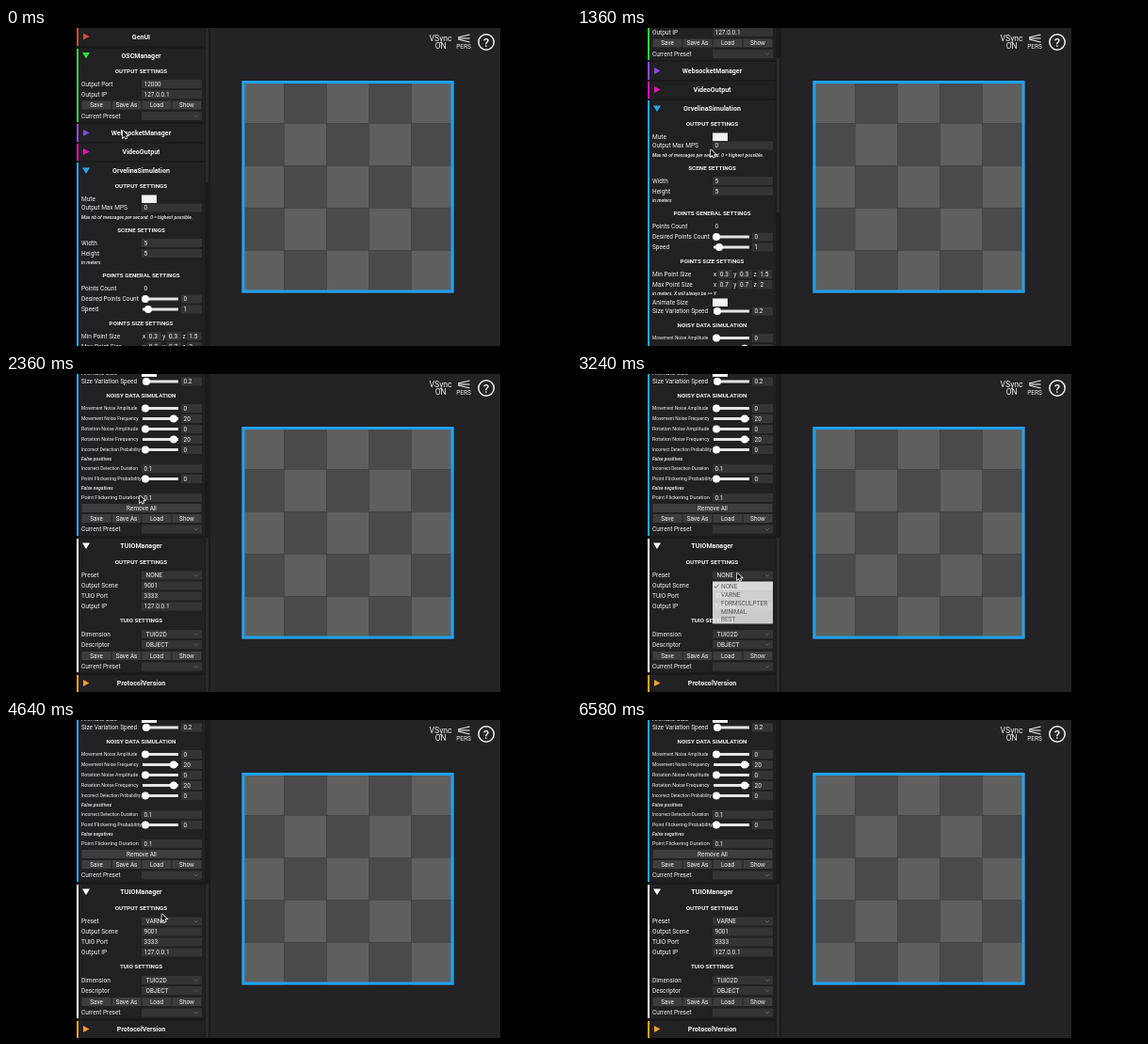
These frames come from a looping animation (600 by 338 pixels, 7300 ms). An HTML page with a canvas:

```html
<!DOCTYPE html>
<html lang="en">
<head>
<meta charset="utf-8">
<title>Settings panel</title>
<style>
html, body { margin: 0; width: 100%; height: 100%; overflow: hidden; background: #000; }
canvas { display: block; width: 600px; height: 338px; }
</style>
</head>
<body>
<canvas id="stage" width="600" height="338"></canvas>
<script>
const c = document.getElementById('stage').getContext('2d');
const LOOP = 7300, MAX_SCROLL = 359, WHEEL_STEP = 33;
const WHITE = '#f2f2f2', FIELD = '#343436', BLUE = '#1ea2f1';
const OPTIONS = ['NONE', 'VARNE', 'FORMSCULPTER', 'MINIMAL', 'BEST'];

// Each wheel tick scrolls by one fixed step.
const TICKS = [970, 1360, 1400, 1440, 1480, 1520, 1760, 1800, 1840, 1890, 1940];
const OPEN = 3120, PICK = 4120, FADE = 150;

// Cursor stops: time, x, y
const PATH = [
  [0, 124, 109], [30, 124, 109], [730, 142, 129], [2360, 142, 129], [2910, 170, 211],
  [3220, 170, 211], [3610, 169, 236], [4220, 169, 236], [4640, 165.5, 206],
  [4760, 165.5, 206], [5420, 131, 240], [5520, 131, 240], [5940, 157, 205],
  [6120, 157, 205], [6580, 79, 19]
];

function rect(x, y, w, h, color) {
  c.fillStyle = color;
  c.fillRect(x, y, w, h);
}

function text(s, x, y, size = 6.5, { style = '', align = 'left', color = WHITE } = {}) {
  c.font = `${style} ${size}px Roboto, "Liberation Sans", sans-serif`;
  c.textAlign = align;
  c.fillStyle = color;
  c.fillText(s, x, y + size * 0.355);
}

function shape(points, color) {
  c.beginPath();
  points.forEach(([x, y]) => c.lineTo(x, y));
  c.closePath();
  c.fillStyle = color;
  c.fill();
}

function line(points, color, width) {
  c.beginPath();
  points.forEach(([x, y]) => c.lineTo(x, y));
  c.strokeStyle = color;
  c.lineWidth = width;
  c.stroke();
}

function section(name, y, top, bottom, color, open) {
  rect(75, top, 136, bottom - top, '#212022');
  rect(75, top, 2, bottom - top, color);
  shape(open ? [[81, y - 3], [89, y - 3], [85, y + 3.5]]
             : [[82, y - 3.5], [82, y + 3.5], [88.5, y]], color);
  text(name, 143.5, y, 7.1, { style: 'bold', align: 'center' });
}

const heading = (s, y) => text(s, 143.5, y, 6.25, { style: 'bold', align: 'center' });
const note = (s, y) => text(s, 80, y, 5, { style: 'italic 500' });
const label = (s, y, size) => text(s, 80, y, size);

function box(x, y, w, s) {
  rect(x, y - 4.5, w, 9, FIELD);
  text(s, x + 2.5, y);
}

function field(name, value, y, size) {
  label(name, y, size);
  box(144, y, 64, value);
}

function toggle(name, y) {
  label(name, y);
  rect(144, y - 4, 16, 8.5, WHITE);
}

function slider(name, value, knob, y, size) {
  label(name, y, size);
  rect(145, y - 1.5, 38, 3, '#e4e4e4');
  c.beginPath();
  c.arc(knob, y, 4, 0, 7);
  c.fillStyle = '#fff';
  c.fill();
  box(186, y, 22, value);
}

function vector(name, values, y) {
  label(name, y);
  values.forEach((v, i) => {
    const x = 145 + i * 21.3;
    text('xyz'[i], x, y);
    box(x + 4.3, y, 15.5, v);
  });
}

function select(name, value, y) {
  label(name, y);
  rect(144, y - 4.5, 64, 9, FIELD);
  text(value, 148.5, y);
  line([[200, y - 1], [202, y + 1], [204, y - 1]], '#6a6a6c', 0.8);
}

function button(s, x, y, w) {
  rect(x, y - 4.5, w, 9, '#3d3d3f');
  text(s, x + w / 2, y, 6.4, { align: 'center' });
}

function presets(y) {
  ['Save', 'Save As', 'Load', 'Show'].forEach((s, i) => button(s, 80.5 + i * 32, y, 31));
  select('Current Preset', '', y + 11.5);
}

function drawContent(preset) {
  section('GenUI', 9, 0, 19, '#e5443c');
  section('OSCManager', 29, 22, 100, '#2edb38', true);
  heading('OUTPUT SETTINGS', 45.5);
  field('Output Port', '12000', 59.5);
  field('Output IP', '127.0.0.1', 70.5);
  presets(82);
  section('WebsocketManager', 111.5, 102, 121, '#8a4be0');
  section('VideoOutput', 131.5, 123, 141, '#ee10c0');

  section('OrvelinaSimulation', 151.5, 143, 531, '#27a6ee', true);
  heading('OUTPUT SETTINGS', 168);
  toggle('Mute', 181.5);
  field('Output Max MPS', '0', 191);
  note('Max nb of messages per second. 0 = highest possible.', 201);
  heading('SCENE SETTINGS', 214.5);
  field('Width', '5', 228.5);
  field('Height', '5', 239.5);
  note('in meters', 249.5);
  heading('POINTS GENERAL SETTINGS', 262.5);
  label('Points Count', 277);
  text('0', 146.5, 277);
  slider('Desired Points Count', '0', 148, 288);
  slider('Speed', '1', 151, 299);
  heading('POINTS SIZE SETTINGS', 313.5);
  vector('Min Point Size', ['0.3', '0.3', '1.5'], 327.5);
  vector('Max Point Size', ['0.7', '0.7', '2'], 338.5);
  note('in meters. X will always be >= Y', 348.5);
  toggle('Animate Size', 357.5);
  slider('Size Variation Speed', '0.2', 149, 367);
  heading('NOISY DATA SIMULATION', 381.5);
  slider('Movement Noise Amplitude', '0', 148, 395.5, 4.8);
  slider('Movement Noise Frequency', '20', 178, 406.5, 4.9);
  slider('Rotation Noise Amplitude', '0', 148, 417.5, 5.3);
  slider('Rotation Noise Frequency', '20', 178, 428.5, 5.3);
  slider('Incorrect Detection Probability', '0', 148, 439.5, 4.7);
  note('False positives', 449.5);
  field('Incorrect Detection Duration', '0.1', 459.5, 4.8);
  slider('Point Flickering Probability', '0', 148, 470.5, 5.4);
  note('False negatives', 480.5);
  field('Point Flickering Duration', '0.1', 490.5, 5.6);
  button('Remove All', 80.5, 501.5, 127);
  presets(512.5);

  section('TUIOManager', 541.5, 534, 676, '#fff', true);
  heading('OUTPUT SETTINGS', 558.5);
  select('Preset', preset, 573);
  field('Output Scene', '9001', 584);
  field('TUIO Port', '3333', 595);
  field('Output IP', '127.0.0.1', 606);
  heading('TUIO SETTINGS', 620.5);
  select('Dimension', 'TUIO2D', 635.5);
  select('Descriptor', 'OBJECT', 646.5);
  presets(658.5);
  section('ProtocolVersion', 687.5, 679, 697, '#f4a41d');
}

function drawList(alpha, hover) {
  c.globalAlpha = alpha;
  rect(144, 220.5, 64, 45, '#f4f4f4');
  rect(144, 221 + hover * 8.9, 64, 8.9, '#dcdcdc');
  OPTIONS.forEach((s, i) => text(s, 153, 225.5 + i * 8.9, 6.5, { color: '#3a3a3a' }));
  line([[146, 225.5], [147.5, 227.5], [150.5, 223.5]], '#3a3a3a', 0.9);
  c.globalAlpha = 1;
}

function drawScene() {
  rect(217, 0, 308, 338, '#232224');
  for (let i = 0; i < 25; i++)
    rect(250.5 + i % 5 * 45, 56.5 + Math.floor(i / 5) * 45, 45, 45, i % 2 ? '#4a494b' : '#5f5f60');
  c.strokeStyle = BLUE;
  c.lineWidth = 3;
  c.strokeRect(252, 57.5, 222, 222.5);

  text('VSync', 461.5, 10.5, 8.6, { align: 'center' });
  text('ON', 461.5, 19.5, 8.4, { align: 'center' });
  text('PERS', 486, 20, 6.4, { align: 'center' });
  for (const d of [-1, 0, 1]) line([[480, 11 + d], [492.5, 11 + d * 4]], WHITE, 1.1);
  c.beginPath();
  c.arc(510, 15, 8.2, 0, 7);
  c.lineWidth = 1.5;
  c.stroke();
  text('?', 510, 15, 13, { style: '500', align: 'center' });
}

function drawCursor(t) {
  const next = PATH.findIndex(p => p[0] > t);
  if (next < 0) return;
  const [t0, x0, y0] = PATH[next - 1], [t1, x1, y1] = PATH[next];
  const u = (t - t0) / (t1 - t0), e = u * u * (3 - 2 * u);
  c.save();
  c.translate(x0 + (x1 - x0) * e, y0 + (y1 - y0) * e);
  const arrow = [[0, 0], [0, 7.5], [1.8, 5.9], [3, 8.6], [4.2, 8], [3, 5.4], [5.3, 5.3], [0, 0]];
  line(arrow, '#fff', 1.5);
  shape(arrow, '#111');
  c.restore();
}

function draw(t) {
  const scroll = Math.min(MAX_SCROLL, WHEEL_STEP * TICKS.filter(k => k <= t).length);
  const clamp = v => Math.max(0, Math.min(1, v));
  rect(0, 0, 600, 338, '#000');
  rect(75, 0, 142, 338, '#1a191b');
  c.save();
  c.translate(0, -scroll);
  drawContent(t < PICK ? OPTIONS[0] : OPTIONS[1]);
  c.restore();
  rect(211, 0, 6, 338, '#1b1a1c');
  rect(212, scroll * 338 / 697, 3, 164, '#2b2a2c');
  const alpha = t < PICK ? clamp((t - OPEN) / FADE) : clamp(1 - (t - PICK) / FADE);
  if (alpha > 0) drawList(alpha, t < 3480 ? 0 : 1);
  drawScene();
  drawCursor(t);
}

function tick() {
  draw(performance.now() % LOOP);
  requestAnimationFrame(tick);
}
tick();
</script>
</body>
</html>
```
